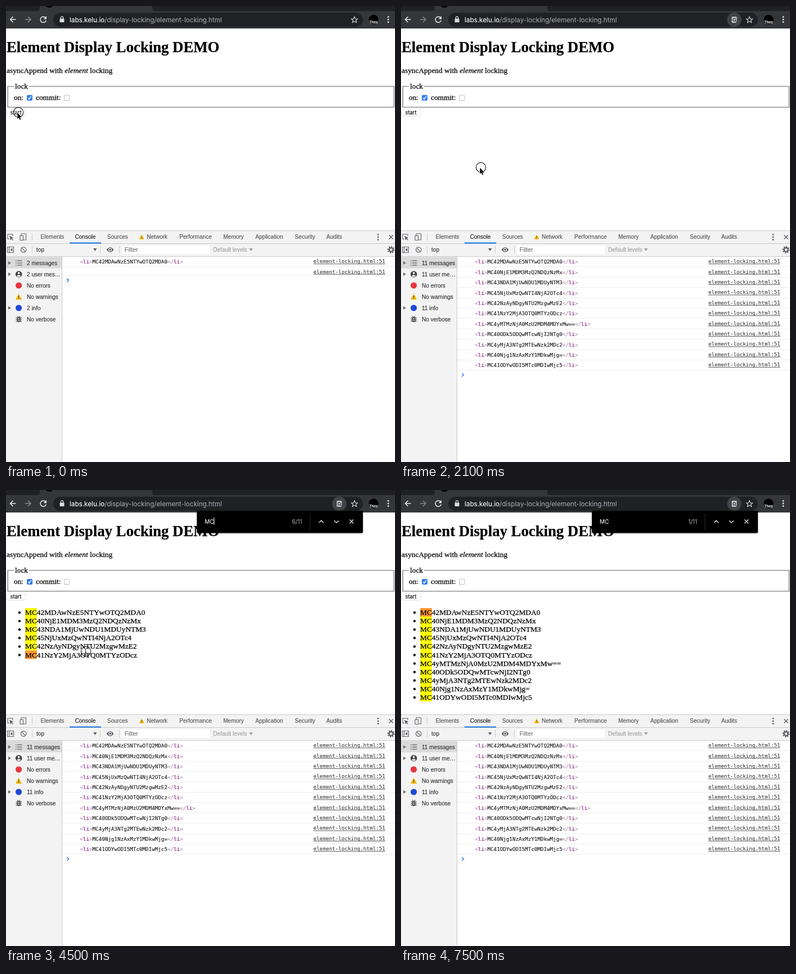
An HTML page with a canvas that plays this animation: 691x811 px, repeating every 7.65 s.

```html
<!DOCTYPE html>
<html lang="en">
<head>
<meta charset="utf-8">
<title>Element Display Locking DEMO</title>
<style>
html, body { margin: 0; height: 100%; overflow: hidden; background: #fff; }
canvas { display: block; }
</style>
</head>
<body>
<canvas width="691" height="811"></canvas>
<script>
const W = 691, H = 811, LOOP = 7650, TICK = 150;
const c = document.querySelector('canvas').getContext('2d');
const SERIF = '"Liberation Serif", serif', SANS = '"Liberation Sans", sans-serif';
const MONO = '"DejaVu Sans Mono", monospace', UI = 'Inter, sans-serif';
const BODY = 13.37, ROW = 18.4, GREY = '#5f6368';

const items = ['0.6000719560946004', '0.4615037346443731', '0.7405250455052537',
  '0.9651340528606978', '0.6702482556380316', '0.5766207944163873',
  '0.21336043560380613', '0.4899840170626584', '0.2207586110796076',
  '0.468570136509028', '0.5860829174020279'].map(n => btoa(n));
// moments at which each further list item is found and shown
const found = [2850, 3600, 3900, 4050, 4350, 4500, 4650, 4800, 5100, 5250, 5550];

const ease = p => { p = Math.min(1, Math.max(0, p)); return p * p * (3 - 2 * p); };

function rect(x, y, w, h, color) {
  c.fillStyle = color;
  c.fillRect(x, y, w, h);
}
function round(x, y, w, h, r, color) {
  c.fillStyle = color;
  c.beginPath();
  c.roundRect(x, y, w, h, r);
  c.fill();
}
function disc(x, y, r, color) {
  c.fillStyle = color;
  c.beginPath();
  c.arc(x, y, r, 0, 7);
  c.fill();
}
function line(d, color, width = 1, x = 0, y = 0) {
  c.save();
  c.translate(x, y);
  c.strokeStyle = color;
  c.lineWidth = width;
  c.stroke(new Path2D(d));
  c.restore();
}
function shape(d, color, x = 0, y = 0) {
  c.save();
  c.translate(x, y);
  c.fillStyle = color;
  c.fill(new Path2D(d));
  c.restore();
}
// returns the x where the text ends; a hairline stroke gives the soft, heavier look
function text(s, x, y, font, color, weight = 0.15) {
  c.font = font;
  c.fillStyle = c.strokeStyle = color;
  c.lineWidth = weight;
  c.fillText(s, x, y);
  c.strokeText(s, x, y);
  return x + c.measureText(s).width;
}
const label = (s, x, y, color = '#5a5a5a') => text(s, x, y, '10.05px ' + SANS, color);

// page text with search hits behind it
function serif(s, x, y, query, first = '#ff0', size = BODY, style = '') {
  const font = `${style} ${size}px ${SERIF}`;
  c.font = font;
  let color = first;
  for (let i = 0; query && i < s.length; i++) {
    const hit = s.substr(i, query.length);
    if (hit.toLowerCase() !== query.toLowerCase()) continue;
    rect(x + c.measureText(s.slice(0, i)).width, y - 0.9 * size,
      c.measureText(hit).width, 1.13 * size, color);
    color = '#ff0';
  }
  return text(s, x, y, font, '#000', 0.25);
}

function warning(x, y, s) {
  c.save();
  c.translate(x, y);
  c.scale(s, s);
  shape('M0-5.5L6 5.5H-6Z', '#f4b400');
  rect(-0.6, -1.6, 1.2, 3.7, '#444');
  rect(-0.6, 3, 1.2, 1.2, '#444');
  c.restore();
}
function kebab(x, y, color) {
  for (const d of [-4.7, 0, 4.7]) disc(x, y + d, 1.4, color);
}

function toolbar(t) {
  rect(0, 0, W, 40, '#35363a');
  rect(0, 0, W, 9, '#202124');
  shape('M55 9Q60 9 60 4V0H260V4Q260 9 265 9Z', '#35363a');
  disc(77, -5, 8, '#000');
  round(84, 12, 550, 25, 12.5, '#202124');
  const light = '#e8eaed';
  line('M17.5 24H7.5M12.5 19L7.5 24L12.5 29', light, 1.5);
  line('M34 24H44M39 19L44 24L39 29', '#85878a', 1.5);
  line('M70.3 20.8A5.2 5.2 0 1 0 71.3 25.5', light, 1.5);
  shape('M72 18V23.3H66.7Z', light);
  round(95.5, 22.5, 8, 6.5, 1, '#dadce0');
  line('M97.3 23V21A2.2 2.2 0 0 1 101.7 21V23', '#dadce0', 1.2);
  const end = text('labs.kelu.io', 113, 28.5, '11.69px ' + UI, '#f1f3f4');
  text('/display-locking/element-locking.html', end, 28.5, '11.69px ' + UI, '#9aa0a6');
  if (t >= 2100) {
    disc(592, 24.5, 12.7, '#414347');
    round(587.5, 19, 9, 11, 1.3, '#bdc1c6');
    c.strokeStyle = '#414347';
    c.lineWidth = 1.2;
    c.beginPath();
    c.arc(592, 24.5, 2.3, 0, 7);
    c.stroke();
    line('M593.7 26.2L597 29.5', '#414347', 1.2);
  }
  line('M0-5.5L1.6-1.8L5.5-1.6L2.5 1L3.5 4.9L0 2.8L-3.5 4.9L-2.5 1L-5.5-1.6L-1.6-1.8Z', '#dadce0', 1.1, 619, 24.5);
  disc(653, 24, 8.5, '#000');
  c.textAlign = 'center';
  text('Theo', 653, 30.5, '600 6px ' + UI, '#fff');
  c.textAlign = 'left';
  kebab(679, 24, light);
}

function page(t, query) {
  rect(0, 40, W, 360, '#fff');
  const q = query === 'M' ? query : '';
  serif('Element Display Locking DEMO', 1, 82, q, '#ff0', 2 * BODY, 'bold');
  let x = serif('asyncAppend with ', 1, 119, q);
  x = serif('element', x, 119, q, '#ff0', BODY, 'italic');
  serif(' locking', x, 119, q);

  line('M14 143H3.2V180H689.3V143H41', '#949494', 1.7);
  serif('lock', 16, 147, q);
  serif('on:', 14, 167, q);
  round(37, 158.2, 10, 10, 2, '#2f7bf0');
  line('M39.3 163.4L41.3 165.7L44.8 160.4', '#fff', 1.5);
  serif('commit:', 53, 167, q);
  round(103, 158.2, 10.2, 10.2, 2, '#b5b5b5');
  round(103.8, 159, 8.6, 8.6, 1.5, '#fff');
  round(1.5, 183, 33, 13.3, 3, '#cfcfcf');
  round(2, 183.3, 32, 12.2, 2.6, '#fff');
  text('start', 7.5, 192.8, '9.4px ' + UI, '#000');

  const shown = found.filter(f => f <= t).length;
  const active = t >= 6000 ? 1 : shown;
  for (let i = 0; i < shown; i++) {
    const y = 222 + 15.1 * i;
    disc(24, y - 4, 2.2, '#000');
    serif(items[i], 34, y, query, i + 1 === active ? '#ff9632' : '#ff0');
  }
  return active;
}

function findBar(t, typed, active) {
  c.save();
  c.shadowColor = 'rgba(0,0,0,.3)';
  c.shadowBlur = 3;
  c.shadowOffsetY = 1;
  round(339, 37, 295, 39.6, [0, 0, 2, 2], '#000');
  c.restore();
  const end = text(typed, 353, 59.7, '10px ' + UI, '#e8eaed');
  const off = t >= 4050 && t < 4500 || t >= 6600 && t < 7050 || t >= 7500;
  if (!off) rect(Math.round(end), 49, 1, 13, '#fff');
  if (active) {
    c.textAlign = 'right';
    text(typed === 'M' ? '6/47' : active + '/11', 526, 59.7, '10px ' + UI, '#9aa0a6');
    c.textAlign = 'left';
  }
  rect(539.5, 42, 1, 28, '#2c2d30');
  const arrows = active ? '#dadce0' : '#5f6368';
  line('M556 58.2L560 54.2L564 58.2M583 54.2L587 58.2L591 54.2', arrows, 1.4);
  line('M610.3 52.5L617.3 59.5M617.3 52.5L610.3 59.5', '#dadce0', 1.4);
}

function devtools() {
  rect(0, 399, W, H - 399, '#fff');
  rect(0, 399, W, 46, '#f3f3f3');
  rect(0, 445, 99, H - 445, '#f3f3f3');
  for (const y of [399, 422, 445]) rect(0, y, W, 1, '#cacaca');
  rect(99, 445, 1, H - 445, '#cacaca');

  line('M6 414.5H3V406H12V409', GREY, 1.1);
  shape('M6 409L13.5 412L10.3 413.2L13 416L12 417L9.3 414.2L8 417Z', GREY);
  line('M27 408V405H35.5V416H31M25 408.5H30.5V416.5H25Z', GREY, 1.1);
  rect(46, 404, 1, 13, '#ccc');
  for (const [s, x] of [['Elements', 61.5], ['Console', 122.5], ['Sources', 179.7], ['Network', 250],
    ['Performance', 308], ['Memory', 386], ['Application', 443], ['Security', 513], ['Audits', 569]])
    label(s, x, 414, s === 'Console' ? '#222' : '#555');
  rect(113, 420.5, 56, 2, '#1a73e8');
  warning(241, 410.7, 0.75);
  kebab(661, 411, GREY);
  line('M680.5 407.5L687.5 414.5M687.5 407.5L680.5 414.5', GREY, 1.5);

  line('M2.5 428.5H13.5V438.5H2.5ZM5.5 428.5V438.5', GREY, 1.1);
  shape('M11.5 430.5V436.5L7.3 433.5Z', GREY);
  line('M26.5 433.5A4.7 4.7 0 1 1 35.9 433.5A4.7 4.7 0 1 1 26.5 433.5M28 430.2L34.5 436.8', GREY, 1.2);
  for (const x of [46, 167, 201]) rect(x, 427, 1, 13, '#ccc');
  label('top', 54, 436.7, '#333');
  shape('M155 431H161.4L158.2 436Z', GREY);
  shape('M178.5 433.5Q185 425 191.5 433.5Q185 442 178.5 433.5Z', GREY);
  disc(185, 433.5, 3, '#f3f3f3');
  disc(185, 433.5, 1.8, GREY);
  rect(206, 426, 156, 15, '#fff');
  text('Filter', 210.5, 437.3, '10.9px ' + SANS, '#757575');
  label('Default levels', 368, 436.7, '#a0a0a0');
  shape('M432 431H438.4L435.2 436Z', '#a0a0a0');
  c.setLineDash([2.2, 1.9]);
  line('M678.6 433.5A5.4 5.4 0 1 1 689.4 433.5A5.4 5.4 0 1 1 678.6 433.5', GREY, 2);
  c.setLineDash([]);
  line('M680.5 433.5A3.5 3.5 0 1 1 687.5 433.5A3.5 3.5 0 1 1 680.5 433.5', GREY, 2.4);
}

function sidebar(n) {
  rect(0, 446.5, 99, 20, '#dadada');
  for (const y of [457, 477, 537]) shape('M4 -3L9 0L4 3Z', '#6e6e6e', 0, y);
  for (const d of [-4, 0, 4]) {
    rect(17, 456.4 + d, 1.6, 1.3, GREY);
    rect(20, 456.4 + d, 8.5, 1.3, GREY);
  }
  disc(22.7, 477, 5.8, '#444');
  disc(22.7, 475, 1.9, '#f3f3f3');
  shape('M19 480.2Q22.7 476.4 26.4 480.2Q22.7 483.4 19 480.2Z', '#f3f3f3');
  disc(22.6, 497, 5.6, '#e8363f');
  warning(22.6, 517, 0.95);
  disc(22.6, 537, 5.6, '#1f48d5');
  round(19.6, 552.8, 6.2, 9.4, 3, '#555');
  line('M17.5 554.6H28M17.5 557.6H28M17.5 560.6H28M20 551.3L21.6 553M25.4 551.3L23.8 553', '#555', 1.1);
  line('M21.3 556H24.1M21.3 559H24.1', '#f3f3f3', 1);
  const names = [n + ' messages', n + (n < 10 ? ' user mes…' : ' user me…'),
    'No errors', 'No warnings', n + ' info', 'No verbose'];
  names.forEach((s, i) => label(s, 37, 460.5 + 20.05 * i, '#333'));
}

function messages(n, pending) {
  const font = '9.22px ' + MONO;
  for (let i = 0; i < n; i++) {
    const y = 458.3 + ROW * i, empty = pending && i === n - 1;
    if (!empty) {
      let x = text('<', 131.3, y, font, '#a894a6');
      x = text('li', x, y, font, '#881280');
      x = text('>', x, y, font, '#a894a6');
      x = text(items[i], x, y, font, '#222');
      x = text('</', x, y, font, '#a894a6');
      x = text('li', x, y, font, '#881280');
      text('>', x, y, font, '#a894a6');
    }
    const end = text('element-locking.html:51', 546, y - 1.2, font, '#484848');
    rect(546, y, end - 546, 0.9, '#484848');
    rect(100, Math.round(y + (empty ? 2 : 5)), W - 100, 1, '#efefef');
  }
  const y = 453.8 + ROW * n - (pending ? 3 : 0);
  line('M108.2 -3L111.3 0L108.2 3', '#367cf1', 1.5, 0, y);
}

function pointer(t) {
  if (t >= 7350) return;
  const a = ease(t / 450), b = ease((t - 6300) / 1050);
  const x = 22 + 120 * a + 531 * b, y = 189 + 98 * a + 526 * b;
  line('M-8.6 0A8.6 8.6 0 1 1 8.6 0A8.6 8.6 0 1 1 -8.6 0', '#111', 1.1, x, y);
  if (t >= 4500 && t < 6600) {
    line('M-3 -5.5Q-.5 -5.5 -.5 -4V4.5Q-.5 6 -3 6M2 -5.5Q-.5 -5.5 -.5 -4M2 6Q-.5 6 -.5 4.5M-2 2H1', '#333', 1, x, y);
    return;
  }
  const arrow = 'M0 0V11L2.5 8.8L4.2 12.7L6 11.9L4.3 8.1H7.8Z';
  line(arrow, '#fff', 1.6, x - 1.7, y + 0.8);
  shape(arrow, '#000', x - 1.7, y + 0.8);
}

function draw(now) {
  const t = Math.floor(now % LOOP / TICK) * TICK;
  const typed = t >= 3150 ? 'MC' : t >= 2700 ? 'M' : '';
  const count = Math.min(11, Math.round(2 + 1.3 * t / TICK));
  toolbar(t);
  const active = page(t, t >= 2850 ? typed : '');
  if (t >= 2250) findBar(t, typed, active);
  devtools();
  sidebar(count);
  messages(count, t < TICK);
  pointer(t);
}

const start = performance.now();
function frame() {
  draw(performance.now() - start);
  requestAnimationFrame(frame);
}
frame();
</script>
</body>
</html>
```
